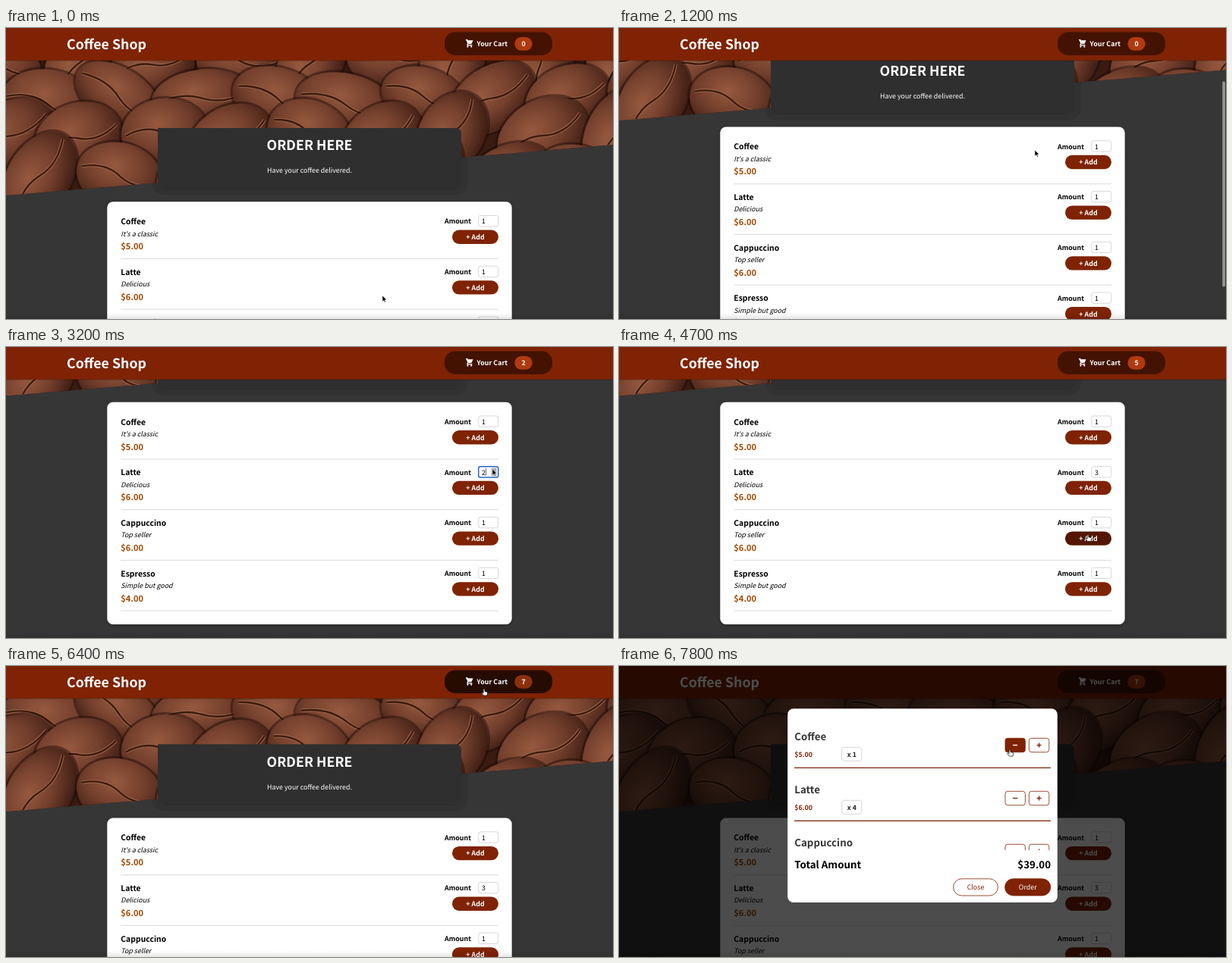
An HTML page that plays this animation: 800x384 px, repeating every 8000 ms.

```html
<!DOCTYPE html>
<html lang="en">
<head>
<meta charset="utf-8">
<title>Coffee Shop</title>
<style>
html, body { margin: 0; width: 100%; height: 100%; overflow: hidden; background: #363636; }
svg { display: block; width: 800px; height: 384px; }
text {
  font: 8.89px "Noto Sans CJK JP", "Noto Sans CJK SC", "Noto Sans JP", "Source Sans Pro", sans-serif;
  white-space: pre; text-rendering: geometricPrecision;
}
.b { font-weight: 700; }
.i { font-style: italic; }
.m { text-anchor: middle; }
.e { text-anchor: end; }
.card { filter: drop-shadow(0 1px 2px rgba(0, 0, 0, .25)); }
</style>
</head>
<body>
<svg viewBox="0 0 800 384">
  <defs>
    <radialGradient id="shell" cx=".42" cy=".36" r=".68">
      <stop offset="0" stop-color="#96593f"/>
      <stop offset=".5" stop-color="#74402d"/>
      <stop offset="1" stop-color="#3c1c12"/>
    </radialGradient>
    <linearGradient id="foot" x2="0" y2="1">
      <stop offset="0" stop-opacity="0"/>
      <stop offset="1" stop-opacity=".1"/>
    </linearGradient>
    <clipPath id="slant"><path d="M0 0H800V154L0 221Z"/></clipPath>
    <clipPath id="list"><path d="M222 56H578V243H222Z"/></clipPath>
    <g id="beans" clip-path="url(#slant)"></g>
  </defs>
  <g id="scene"></g>
</svg>
<script>
const LOOP = 8000, STEP = 100, OPEN = 6600;
const BROWN = '#7f2304', DARK = '#541602';
const MENU = [
  ['Coffee', "It's a classic", 5, 1],
  ['Latte', 'Delicious', 6, 4],
  ['Cappuccino', 'Top seller', 6, 1],
  ['Espresso', 'Simple but good', 4, 1]
];
const money = n => `$${n}.00`;
const TOTAL = MENU.reduce((sum, [, , price, count]) => sum + price * count, 0);

// pointer stops: arrival time, x, y
const addButton = i => [618, 114 + 66.7 * i];
const STOPS = [
  [0, 496, 353], [800, 548, 161], [2400, ...addButton(0)], [2800, ...addButton(1)], [3200, 641, 161],
  [3900, ...addButton(1)], [4600, ...addButton(2)], [5100, ...addButton(3)], [6300, 630, 30], [7700, 515, 110]
];
// clicks on "Add": time, amount
const CLICKS = [[2500, 1], [2900, 1], [4100, 3], [4800, 1], [5300, 1]];

const smooth = p => p * p * (3 - 2 * p);
const ramp = (t, start, length) => Math.min(1, Math.max(0, (t - start) / length));
const scrollAt = t => 156.5 * smooth(ramp(t, 200, 1700)) - 127.8 * smooth(ramp(t, 5700, 500));

function pointerAt(t) {
  return STOPS.reduce(([x, y, from], [at, px, py]) => {
    const start = Math.max(from + 100, at - 500);
    const p = at ? smooth(ramp(t, start, at - start)) : 1;
    return [x + (px - x) * p, y + (py - y) * p, at];
  }, [0, 0, 0]);
}

let seed = 11;
const rand = () => (seed = seed * 16807 % 2147483647) / 2147483647;

// jittered rows of overlapping beans
function beans() {
  let out = '<path d="M0 0H800V240H0Z" fill="#3a1b11"/>';
  for (let row = 0; row < 4; row++) {
    for (let col = 0; col < 9; col++) {
      const x = col * 100 + row % 2 * 50 + rand() * 24 - 12, y = 45 + row * 50 + rand() * 16 - 8;
      const a = 56 + rand() * 12, b = 38 + rand() * 9;
      const seam = `M${-a * .9} 0Q${-a * .4} ${-b * .3} 0 0T${a * .9} 0`;
      out += `<g transform="translate(${x} ${y}) rotate(${rand() * 140 - 100})" fill="none">
        <ellipse rx="${a + 3}" ry="${b + 3}" fill="#1c0a06" opacity=".45"/>
        <ellipse rx="${a}" ry="${b}" fill="url(#shell)"/>
        <path d="${seam}" stroke="#9a6348" stroke-width="4.5"/>
        <path d="${seam}" stroke="#3d1a0e" stroke-width="2.4"/></g>`;
    }
  }
  return out;
}
document.getElementById('beans').innerHTML = beans();

const text = (x, y, str, cls = '', fill = '#000', size = 8.89) =>
  `<text x="${x}" y="${y}" class="${cls}" fill="${fill}" style="font-size:${size}px">${str}</text>`;
const box = (x, y, w, h, r, fill, stroke = 'none', line = .7) =>
  `<rect x="${x}" y="${y}" width="${w}" height="${h}" rx="${r}" fill="${fill}" stroke="${stroke}" stroke-width="${line}"/>`;

function menu(t, over) {
  return MENU.map(([name, note, price], i) => {
    const y = 229.5 + i * 66.7, latte = i === 1;
    const amount = latte ? 1 + (t >= 3200) + (t >= 3400) : 1;
    const focus = latte && t >= 3200 && t < 4100;
    const spin = focus && t < 3800;
    return text(151.3, y + 29.5, name, 'b', '#000', 10.4)
      + text(151.3, y + 45, note, 'i')
      + text(151.3, y + 62.5, money(price), 'b', '#a04800', 11.11)
      + `<path d="M151.3 ${y + 75}H649" stroke="#ccc" stroke-width=".7"/>`
      + text(578, y + 28.8, 'Amount', 'b')
      + box(622.8, y + 18, 26, 14.4, 2.6, '#fff', focus ? '#2767c4' : '#c8c8c8', focus ? 1.5 : .7)
      + text(627, y + 28.8, amount)
      + (focus ? `<path d="M632.6 ${y + 20}v10" stroke="#000" stroke-width=".6"/>` : '')
      + (spin ? box(639.5, y + 20, 7, 10.5, 1, '#aaa') : '')
      + box(588, y + 37.1, 61, 18.3, 9.1, over(588, y + 37, 61, 18, true) ? DARK : BROWN)
      + text(618.5, y + 49.7, '+ Add', 'b m', '#fff');
  }).join('');
}

function page(t, over) {
  return box(192, 124, 417, 96.5, 17, '#313131')
    + '<use href="#beans"/>'
    + '<path d="M200 132H592Q600 132 600 140V205Q600 212 592 212H208Q200 212 200 205Z" fill="#2f2f2f"/>'
    + '<path d="M208 212H592" stroke="#292929" stroke-width=".8"/>'
    + text(400, 161.3, 'ORDER HERE', 'b m', '#fff', 17.78)
    + text(400, 191.3, 'Have your coffee delivered.', 'm', '#fff')
    + `<g class="card">${box(133.3, 229.3, 533.4, 293.2, 7.8, '#fff')}</g>`
    + menu(t, over);
}

function header(t, hover) {
  const done = CLICKS.filter(([at]) => at <= t);
  const count = done.reduce((sum, [, n]) => sum + n, 0);
  const since = done.length ? ramp(t, done[done.length - 1][0], 300) : 1;
  const scale = 1 + .12 * Math.sin(Math.PI * since);
  return '<path d="M0 42.8H800" stroke="#000" stroke-opacity=".3" stroke-width="1.6"/>'
    + box(0, 0, 800, 42.8, 0, BROWN)
    + text(80, 28, 'Coffee Shop', 'b', '#fff', 17.78)
    + `<g transform="translate(649 20.7) scale(${scale}) translate(-649 -20.7)">`
    + box(578, 5.5, 142, 30.4, 13.9, hover ? '#260b01' : '#431200')
    + `<path transform="translate(604.8 14.4) scale(.6)" fill="#fff" d="M2 1H5.8L6.8 3H18L14.5 11H7.4L6.5 12.6H16V14.6H5Q3.5 14 4.4 12.2L5.8 9.8 3 3H2ZM8 17a1.9 1.9 0 1 1-3.8 0 1.9 1.9 0 0 1 3.8 0ZM16 17a1.9 1.9 0 1 1-3.8 0 1.9 1.9 0 0 1 3.8 0Z"/>`
    + text(620.6, 24, 'Your Cart', 'b', '#fff')
    + box(670.3, 12, 23.4, 17.8, 8.9, hover ? '#8a300c' : '#b13a10')
    + text(682, 24, count, 'b m', '#fff') + '</g>';
}

function sign(x, y, plus, hot) {
  const cx = x + 13.2, cy = y + 9.2;
  return box(x, y, 26.4, 18.4, 3.3, hot ? BROWN : '#fff', BROWN, .8)
    + `<path d="M${cx - 3} ${cy}h6${plus ? `M${cx} ${cy - 3}v6` : ''}" stroke="${hot ? '#fff' : BROWN}" stroke-width="1.4"/>`;
}

function modal(t, over) {
  const p = 1 - (1 - ramp(t, OPEN, 300)) ** 2;
  const rows = MENU.slice(0, 3).map(([name, , price, count], i) => {
    const y = i * 70;
    return text(231.2, y + 98.4, name, 'b', '#363636', 13.33)
      + text(231.2, y + 119.8, money(price), 'b', BROWN)
      + box(293.6, y + 107.3, 26.2, 18, 3.3, '#fff', '#c4c4c4')
      + text(306.8, y + 119.8, 'x ' + count, 'b m', '#222')
      + sign(509, y + 95.3, false, over(509, y + 95, 27, 19))
      + sign(540.4, y + 95.3, true, over(540, y + 95, 27, 19))
      + `<path d="M231 ${y + 134.4}H569" stroke="${BROWN}" stroke-width="1.1"/>`;
  }).join('');
  return box(0, 0, 800, 384, 0, 'rgba(0,0,0,.7)')
    + `<g opacity="${p}" transform="translate(0 ${-26.7 * (1 - p)})">`
    + box(222.2, 56.2, 355.6, 255.8, 7.8, '#fff')
    + `<g clip-path="url(#list)">${rows}</g>`
    + text(231.2, 267.3, 'Total Amount', 'b', '#000', 13.33)
    + text(569, 267.3, money(TOTAL), 'b e', '#000', 13.33)
    + box(440.6, 280.8, 58.8, 22.2, 11.1, '#fff', BROWN, .8)
    + text(470, 295.3, 'Close', 'm', BROWN)
    + box(508.6, 280.8, 60.2, 22.2, 11.1, BROWN, BROWN, .8)
    + text(538.7, 295.3, 'Order', 'm', '#fff') + '</g>';
}

function draw(t) {
  const scroll = scrollAt(t), [x, y] = pointerAt(t), open = t >= OPEN;
  let hand = false;
  const over = (left, top, w, h, onPage) => {
    const v = onPage ? y + scroll : y;
    const hit = x > left && x < left + w && v > top && v < top + h && !(onPage && (open || y < 43));
    hand = hand || hit;
    return hit;
  };
  const bar = scroll !== scrollAt(t - 400);
  const body = `<g transform="translate(0 ${-scroll})">${page(t, over)}</g>`
    + box(0, 376, 800, 8, 0, 'url(#foot)')
    + (bar && !open && t < 6200 ? box(795.3, scroll * .71 + .5, 3.6, 271, 1.8, '#979797') : '')
    + header(t, !open && over(578, 5.5, 142, 30.4))
    + (open ? modal(t, over) : '');
  const pointer = hand
    ? '<path d="M-.9.8C-.9-.3.9-.3.9.8V3.4L4 4.2Q5 4.6 4.6 6.2L4 9H-.6L-3 5.8Q-3.2 4.6-2 4.9L-.9 5.8Z" fill="#fff" stroke="#000" stroke-width=".7"/>'
    : '<path d="M0 0V8.2L1.9 6.5 3.2 9.3 4.4 8.8 3.2 6 5.8 5.8Z" fill="#000" stroke="#fff" stroke-width=".6"/>';
  scene.innerHTML = body + `<g transform="translate(${x} ${y})">${pointer}</g>`;
}

const scene = document.getElementById('scene');
let shown = -1;
function tick() {
  const t = Math.floor(performance.now() % LOOP / STEP) * STEP;
  if (t !== shown) draw(shown = t);
  requestAnimationFrame(tick);
}
tick();
</script>
</body>
</html>
```
